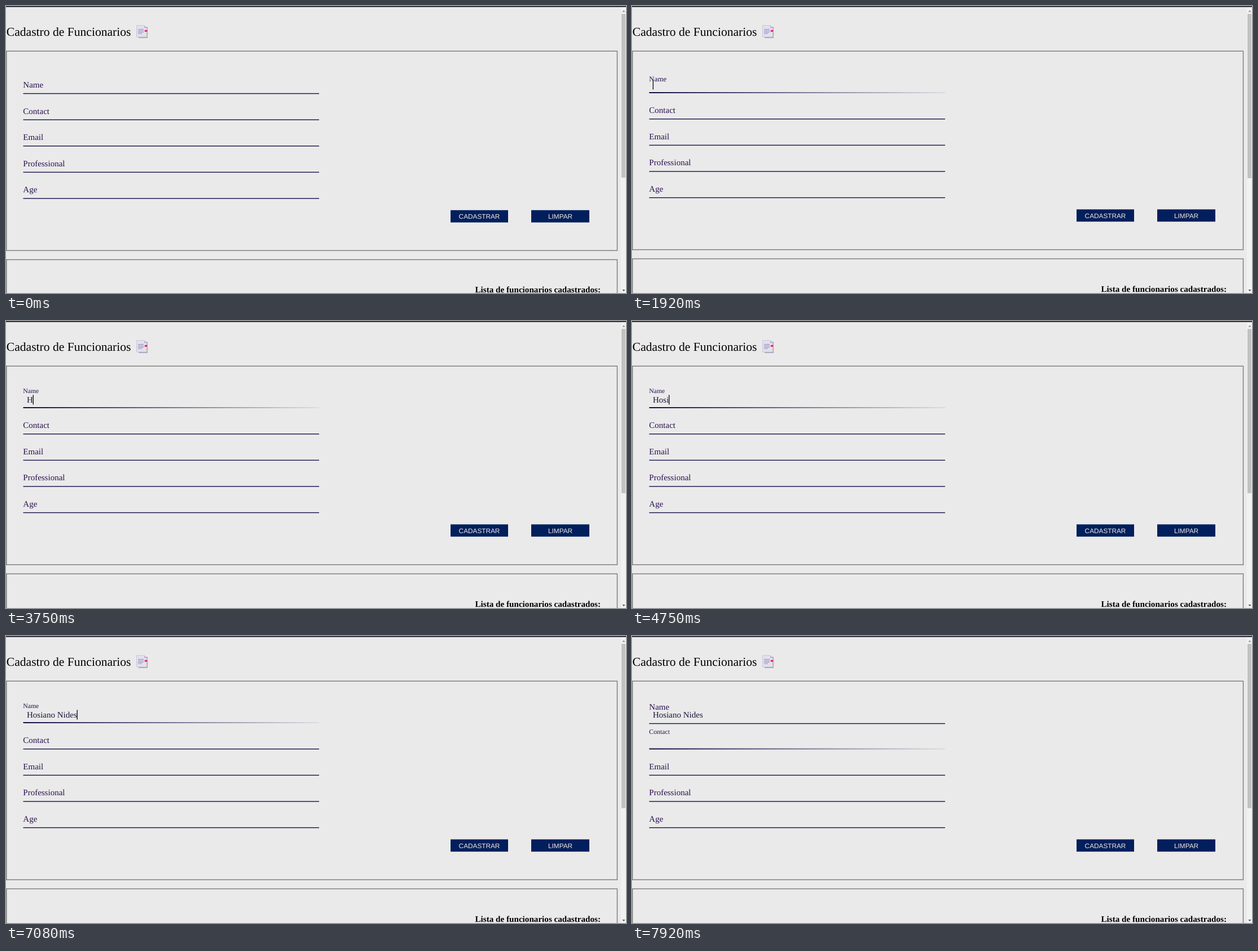
Write an HTML page that moves like this. It is 1099 by 510 pixels and loops after 8 s.

```html
<!DOCTYPE html>
<html lang="pt">
<head>
<meta charset="utf-8">
<title>Cadastro</title>
<style>
  html, body { margin: 0; width: 100%; height: 100%; overflow: hidden; background: #eaeaea; }
  svg { display: block; width: 100%; height: 100%; }
  text { font-family: "Liberation Serif", "Times New Roman", serif; text-rendering: geometricPrecision; white-space: pre; }
  .label { fill: #2b1150; }
  .button text { font: 11.8px "Liberation Sans", Arial, sans-serif; fill: #f1e9df; text-anchor: middle; }
  .button rect { fill: #001f5c; }
  .frame { fill: none; stroke: #808080; stroke-width: 1.5; }
</style>
</head>
<body>
<svg viewBox="0 0 1099 510">
  <defs>
    <linearGradient id="fade">
      <stop stop-color="#120a42"/>
      <stop offset="1" stop-color="#120a50" stop-opacity=".06"/>
    </linearGradient>
  </defs>
  <rect width="1099" height="510" fill="#eaeaea"/>

  <text x="0.8" y="53" font-size="21.6">Cadastro de Funcionarios</text>
  <g id="icon">
    <path d="M235 37h16v20h-16z" fill="#aaa5b8"/>
    <path d="M231.5 34.5h13.5l4.5 4.5v16h-18z" fill="#e3e0ee" stroke="#c3bed3" stroke-width=".8"/>
    <path d="M245 34.5v4.5h4.5z" fill="#bbb5cc"/>
    <path d="M234 41.5h10M234 44h10M234 46.5h10M234 49h7" stroke="#9089b8"/>
    <rect x="245.7" y="42.8" width="4.6" height="3" rx="1" fill="#f0127c"/>
    <rect x="248.6" y="48" width="3.6" height="3" rx="1" fill="#f6bd5a"/>
  </g>

  <rect x="0.75" y="80.2" width="1082.7" height="354.3" class="frame" id="form"/>
  <g id="fields"></g>
  <g id="below">
    <g class="button"><rect x="788" y="362.8" width="102" height="21.8"/><text x="839" y="378">CADASTRAR</text></g>
    <g class="button"><rect x="931" y="362.8" width="103" height="21.8"/><text x="982.5" y="378">LIMPAR</text></g>
    <rect x="0.75" y="450.7" width="1082.7" height="100" class="frame"/>
    <text x="1054" y="509" font-size="15.15" font-weight="bold" text-anchor="end">Lista de funcionarios cadastrados:</text>
  </g>
  <text id="typed" x="37" y="145" font-size="15" fill="#1d123c"></text>
  <rect id="caret" width="1.3" height="17.2" fill="#08080c"/>

  <rect x="1090" y="2" width="9" height="508" fill="#f1f1f1"/>
  <rect id="thumb" x="1091" y="14" width="7" fill="#c1c1c1"/>
  <path d="M1092.5 10.5l2.5-3 2.5 3z" fill="#8a8a8a"/>
  <path d="M1092.5 504l2.5 3 2.5-3z" fill="#505050"/>
  <rect width="1099" height="2" fill="#34343f"/>
</svg>
<script>
const LOOP = 8000, NAME_FOCUS = 1920, CONTACT_FOCUS = 7330;
const SHIFT = 1.4, ROW = 46.6;
const FULL_NAME = "Hosiano Nides";
const KEY_TIMES = [3750, 4170, 4500, 4750, 4830, 5080, 5250, 5580, 5920, 6580, 6750, 6920, 7080];
const CARET_OFF = [[2420, 2920], [3420, 3750], [6500, 6580], [7920, LOOP]];
const NAME_EASE = [[1920, .62], [2000, .95], [2080, 1]];
const CONTACT_EASE = [[7330, .12], [7420, .66], [7500, .95], [7580, 1]];

const $ = id => document.getElementById(id);
const set = (el, attrs) => { for (const k in attrs) el.setAttribute(k, attrs[k]); };
const add = (tag, attrs) => {
  const el = document.createElementNS("http://www.w3.org/2000/svg", tag);
  set(el, attrs);
  return $("fields").appendChild(el);
};
const mix = (a, b, p) => a + (b - a) * p;
const stepped = (steps, t) => steps.reduce((value, [at, next]) => t >= at ? next : value, 0);

const fields = ["Name", "Contact", "Email", "Professional", "Age"].map(caption => {
  const label = add("text", { x: 30.3, class: "label" });
  label.textContent = caption;
  return { label, line: add("rect", { x: 30.5, width: 524.5 }) };
});

function drawLine(line, y, focused) {
  const height = focused ? 2 : 1.4;
  set(line, { y: y - height / 2, height, fill: focused ? "url(#fade)" : "#16104a" });
}

function render(t) {
  const focus = t >= CONTACT_FOCUS ? 1 : t >= NAME_FOCUS ? 0 : -1;
  const shift = focus < 0 ? 0 : SHIFT;
  const rise = stepped(NAME_EASE, t), swap = stepped(CONTACT_EASE, t);

  fields.forEach(({ label, line }, i) => {
    const offset = i === 0 && focus === 1 ? 0 : shift;
    drawLine(line, 155.6 + ROW * i - offset - (i === focus ? .2 : 0), i === focus);
    let y = 145 + ROW * i - (i ? shift : 0), size = 15;
    if (i === 0) {
      y = mix(mix(y, 128, rise), 130.5, swap);
      size = mix(mix(15, 11.7, rise), 15, swap);
    } else if (i === 1) {
      y = mix(y, 174, swap);
      size = mix(15, 11.8, swap);
    }
    set(label, { y, "font-size": size });
  });

  $("below").setAttribute("transform", `translate(0 ${-shift})`);
  $("form").setAttribute("height", 354.3 - shift);
  $("thumb").setAttribute("height", focus < 0 ? 291 : 292);

  const typed = $("typed");
  const text = FULL_NAME.slice(0, KEY_TIMES.filter(at => t >= at).length);
  if (typed.textContent !== text) typed.textContent = text;
  const visible = focus >= 0 && !CARET_OFF.some(([from, to]) => t >= from && t < to);
  set($("caret"), {
    x: focus === 0 && text ? 36.8 + typed.getComputedTextLength() : 36.8,
    y: focus === 1 ? 178 : 131.3,
    visibility: visible ? "visible" : "hidden"
  });
}

const start = performance.now();
function tick() {
  render((performance.now() - start) % LOOP);
  requestAnimationFrame(tick);
}
tick();
</script>
</body>
</html>
```
